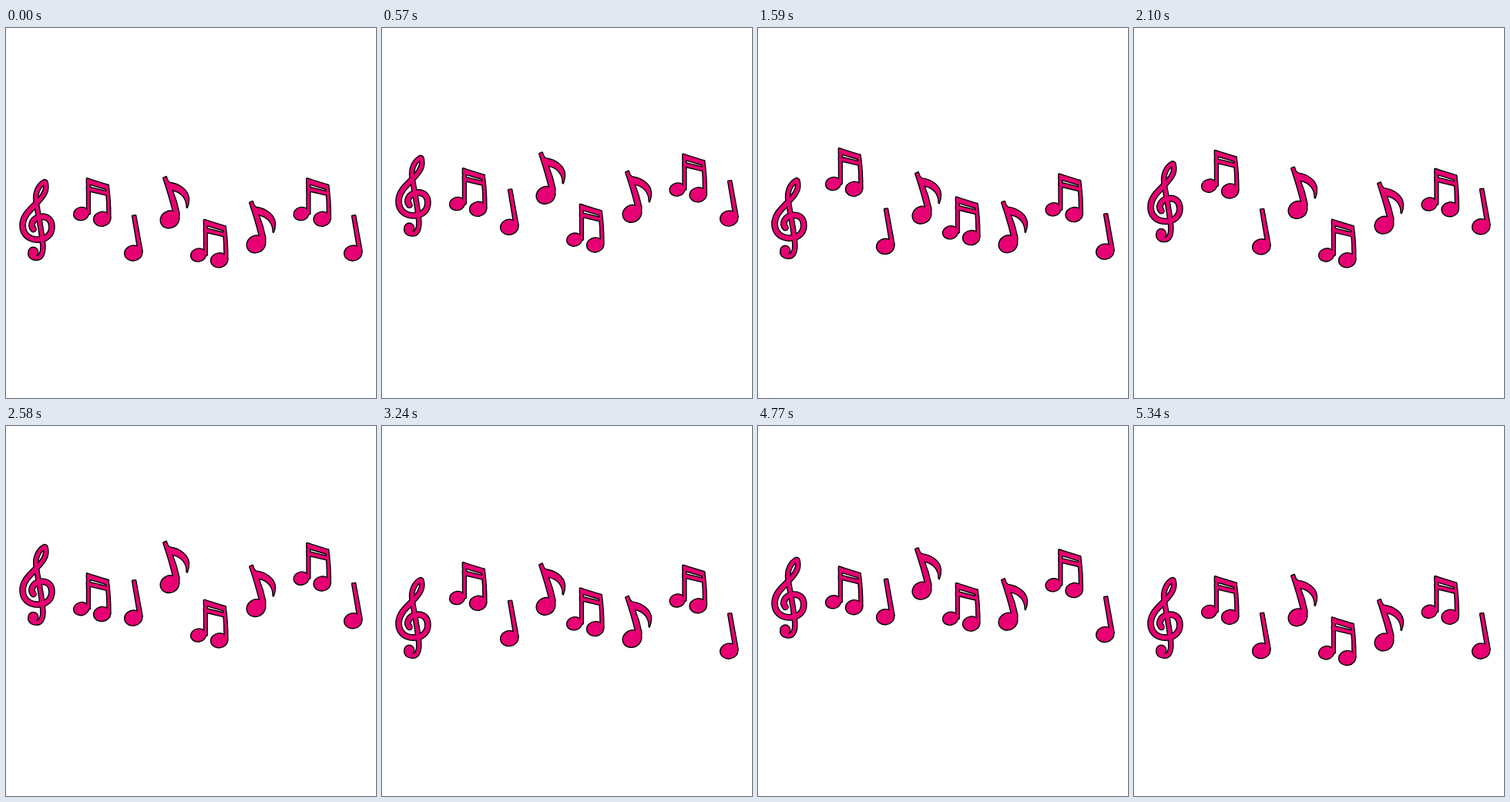
An HTML page with a canvas for the animation above (5370 ms loop, 480 by 480 pixels).

```html
<!DOCTYPE html>
<html>
<head>
<meta charset="utf-8">
<title>Dancing notes</title>
<style>
  html, body { margin: 0; width: 100%; height: 100%; overflow: hidden; background: #fff; }
  canvas { display: block; width: 480px; height: 480px; }
</style>
</head>
<body>
<canvas id="stage" width="480" height="480"></canvas>
<script>
const ctx = document.getElementById('stage').getContext('2d');
const LOOP = 5370, STEP = 30, RISE = 45, EDGE = 2.8;
const PINK = '#e60073', INK = '#000';

// A part is a filled path, or a line when it has a width.
const part = (d, width = 0) => ({ path: new Path2D(d), width });

function oval(x, y, rx, ry, turn) {
  const path = new Path2D();
  path.ellipse(x, y, rx, ry, turn, 0, Math.PI * 2);
  return { path, width: 0 };
}

const clef = [
  part('M35.5 261C31 256 34 246 46 244.8C55 244.3 59.4 250 59.4 258C59.4 268 52 274.6 41 274.6C29 274.6 21.6 267 21.6 256C21.6 244 31 236 39 228', 6),
  part('M39 228C47 220 52.5 213 51.8 205C51.4 200.5 51 199.2 49.6 199.8C42 204 37.5 214 39 225C40.5 236 45.5 258 47.5 278C49 291 46 298 40 298.2C36 298.2 33 297 32 294', 4.8),
  oval(35.3, 291, 5.8, 6, 0)
];

const pair = [
  part('M105.2 195.6L132.4 204L132.4 209.6L105.2 201.4Z'),
  part('M105.2 206.2L132.4 212.8L132.4 217L105.2 210.6Z'),
  part('M105.2 195.6L108.6 196.6L108.6 241L105.2 241Z'),
  part('M129.8 204L132.4 204Q135.2 222 135.2 247L131.8 247Q131.8 226 129.8 204Z'),
  oval(97.6, 241, 9.4, 7.8, -0.2),
  oval(124.6, 247.8, 10.4, 8.8, -0.15)
];

const quarter = [
  part('M164.2 243.8L168 243.3L176.5 290L171.6 288Z'),
  oval(165.2, 292, 10.9, 9.3, -0.15)
];

const eighth = [
  part('M204.4 194.8L207.8 193.3Q209 199 212.4 201C226 203 236 211 236.8 221Q236.9 228 234.8 232.6C235 222 229 212.5 215.2 210Q221 224 224.2 240L223.8 248L217.6 240Q212.6 219 204.4 194.8Z'),
  oval(212.4, 248.4, 11.8, 10.4, -0.45)
];

// Key times alternate between the top and the resting place.
const bounce = (...times) =>
  [[0, 0], ...times.map((t, i) => [t, i % 2 ? 0 : RISE]), [LOOP, 0]];

const steady = bounce(895, 1790, 2685, 3580, 4500);

const notes = [
  { parts: clef, x: 0, y: 0, keys: bounce(900, 1690, 2480, 3260, 4290) },
  { parts: pair, x: 0, y: 0, keys: [[0, 0], [570, 13], [1590, 39], [1850, RISE], [2740, 0], [3240, 18], [3820, RISE], [4200, 33], [LOOP, 0]] },
  { parts: quarter, x: 0, y: 0, keys: bounce(846, 1880, 2685, 3625, 4860) },
  { parts: eighth, x: 0, y: 0, keys: steady },
  { parts: pair, x: 152, y: 53.5, keys: bounce(1235, 2125, 3020, 3920, 4810) },
  { parts: eighth, x: 112, y: 32, keys: bounce(728, 1623, 2518, 3413, 4308) },
  { parts: pair, x: 285.5, y: 0, keys: steady },
  { parts: quarter, x: 285, y: 0, keys: bounce(558, 1475, 2390, 3240, 4135) }
];

const slope = (a, b) => (b[1] - a[1]) / (b[0] - a[0]);

// Flat at turning points, smooth through the rest.
function tangent(keys, i) {
  if (i === 0 || i === keys.length - 1) return 0;
  const a = slope(keys[i - 1], keys[i]), b = slope(keys[i], keys[i + 1]);
  return a * b <= 0 ? 0 : 2 * a * b / (a + b);
}

function lift(keys, t) {
  let i = 0;
  while (i < keys.length - 2 && t >= keys[i + 1][0]) i++;
  const [t0, y0] = keys[i], [t1, y1] = keys[i + 1];
  const span = t1 - t0, u = (t - t0) / span, v = 1 - u;
  return y0 * v * v * (1 + 2 * u) + y1 * u * u * (3 - 2 * u)
    + span * u * v * (v * tangent(keys, i) - u * tangent(keys, i + 1));
}

function drawNote({ parts, x, y, keys }, t) {
  ctx.save();
  ctx.translate(x, y - lift(keys, t));
  ctx.strokeStyle = INK;
  for (const p of parts) {
    ctx.lineWidth = p.width + EDGE;
    ctx.stroke(p.path);
  }
  ctx.strokeStyle = ctx.fillStyle = PINK;
  for (const p of parts) {
    ctx.lineWidth = p.width;
    if (p.width) ctx.stroke(p.path);
    else ctx.fill(p.path);
  }
  ctx.restore();
}

function draw(now) {
  const t = Math.floor((now % LOOP) / STEP) * STEP;
  ctx.fillStyle = '#fff';
  ctx.fillRect(0, 0, 480, 480);
  ctx.lineCap = ctx.lineJoin = 'round';
  for (const note of notes) drawNote(note, t);
}

const start = performance.now();
function tick() {
  draw(performance.now() - start);
  requestAnimationFrame(tick);
}
tick();
</script>
</body>
</html>
```
